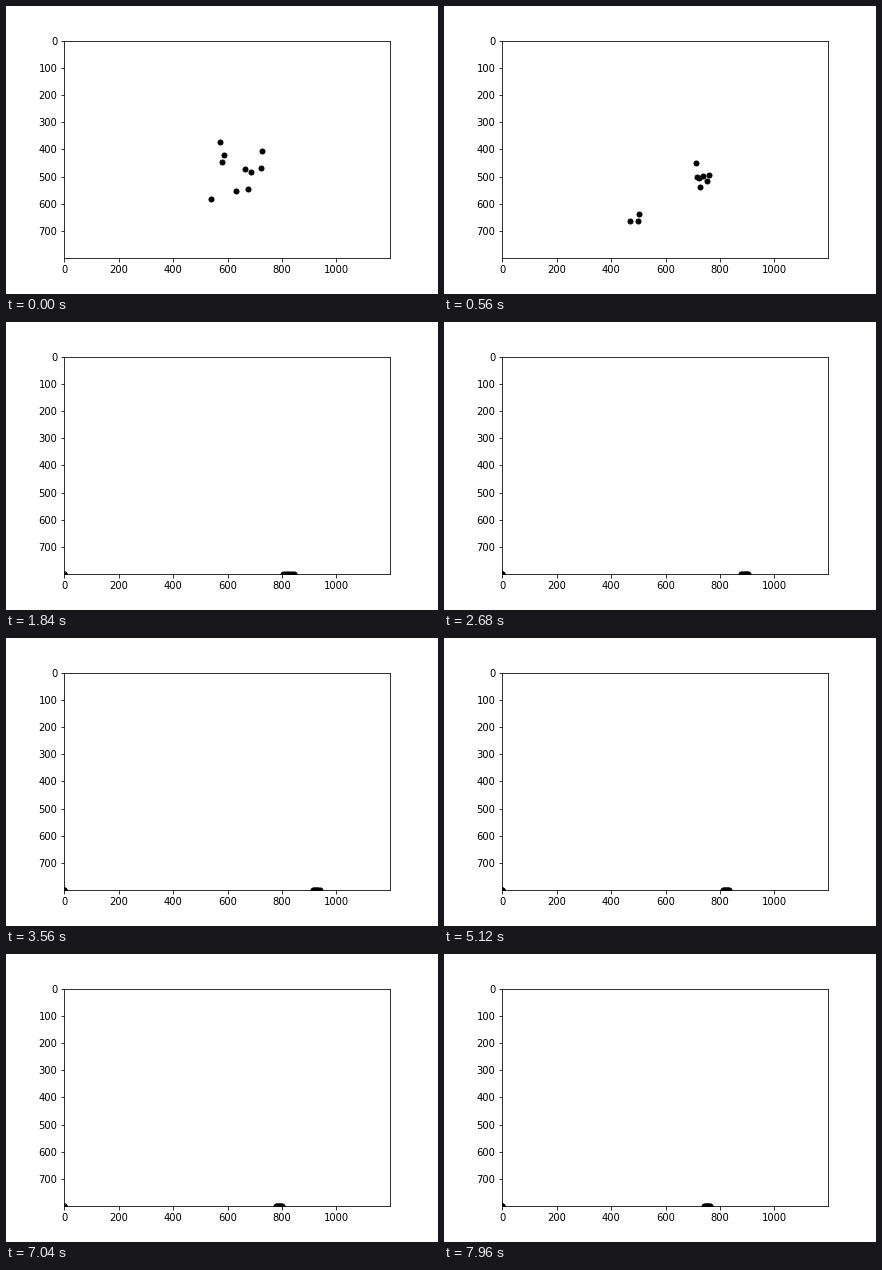
Animation of 432 by 288 pixels, one loop 8 s. Source, as a matplotlib script:

```python
import numpy as np
import matplotlib.pyplot as plt
from matplotlib.animation import FuncAnimation

FRAMES, INTERVAL = 200, 40
W, H = 1200, 800
TURN, LAND = 14, 46


def smooth(t, keys, vals):
    """Cubic Hermite curve through the keys."""
    keys, vals = np.asarray(keys, float), np.asarray(vals, float)
    slope = np.gradient(vals, keys, axis=0)
    i = min(np.searchsorted(keys, t, side="right") - 1, len(keys) - 2)
    h = keys[i + 1] - keys[i]
    s = (t - keys[i]) / h
    return ((2 * s**3 - 3 * s**2 + 1) * vals[i]
            + (s**3 - 2 * s**2 + s) * h * slope[i]
            + (3 * s**2 - 2 * s**3) * vals[i + 1]
            + (s**3 - s**2) * h * slope[i + 1])


# Seven boids drift right, the last three leave for the bottom left corner.
start = np.array([(574, 371), (587, 419), (581, 448), (687, 482), (663, 472),
                  (722, 469), (725, 404), (630, 553), (676, 544), (541, 584)])
turn = np.array([(711, 450), (717, 500), (724, 507), (728, 538), (736, 496),
                 (754, 515), (760, 495), (500, 665), (503, 636), (470, 665)])
slots = np.linspace(-1, 1, 7)


def floor_x(n):
    """The flock slides along the floor, closing up; the rest sit at the wall."""
    centre = smooth(n, [LAND, 86, 128, 153, 199], [824, 928, 821, 815, 752])
    half = 11 + 9 * np.exp((LAND - n) / 15)
    return np.append(centre + half * slots, [-40] * 3)


land = np.column_stack([floor_x(LAND), turn[:, 1] + 400])


def positions(n):
    if n < LAND:
        x, y = smooth(n, [0, TURN, LAND], [start, turn, land]).T
    else:
        x, y = floor_x(n), np.full(10, H)
    return np.clip(x, 0, W), np.clip(y, 0, H)


plt.rcParams.update({"font.family": "DejaVu Sans", "font.size": 10})
fig = plt.figure(figsize=(6, 4), dpi=72, facecolor="white")
ax = fig.add_axes([0.125, 0.125, 0.775, 0.755])
ax.set_aspect("equal")
ax.set_xlim(-0.5, W - 0.5)
ax.set_ylim(H - 0.5, -0.5)
ax.set_xticks(range(0, W, 200))
ax.set_yticks(range(0, H, 100))
dots, = ax.plot([], [], "ko", ms=5, mew=1)


def update(n):
    dots.set_data(*positions(n))
    return dots,


anim = FuncAnimation(fig, update, frames=FRAMES, interval=INTERVAL,
                     repeat=True, repeat_delay=0)
plt.show()
```
